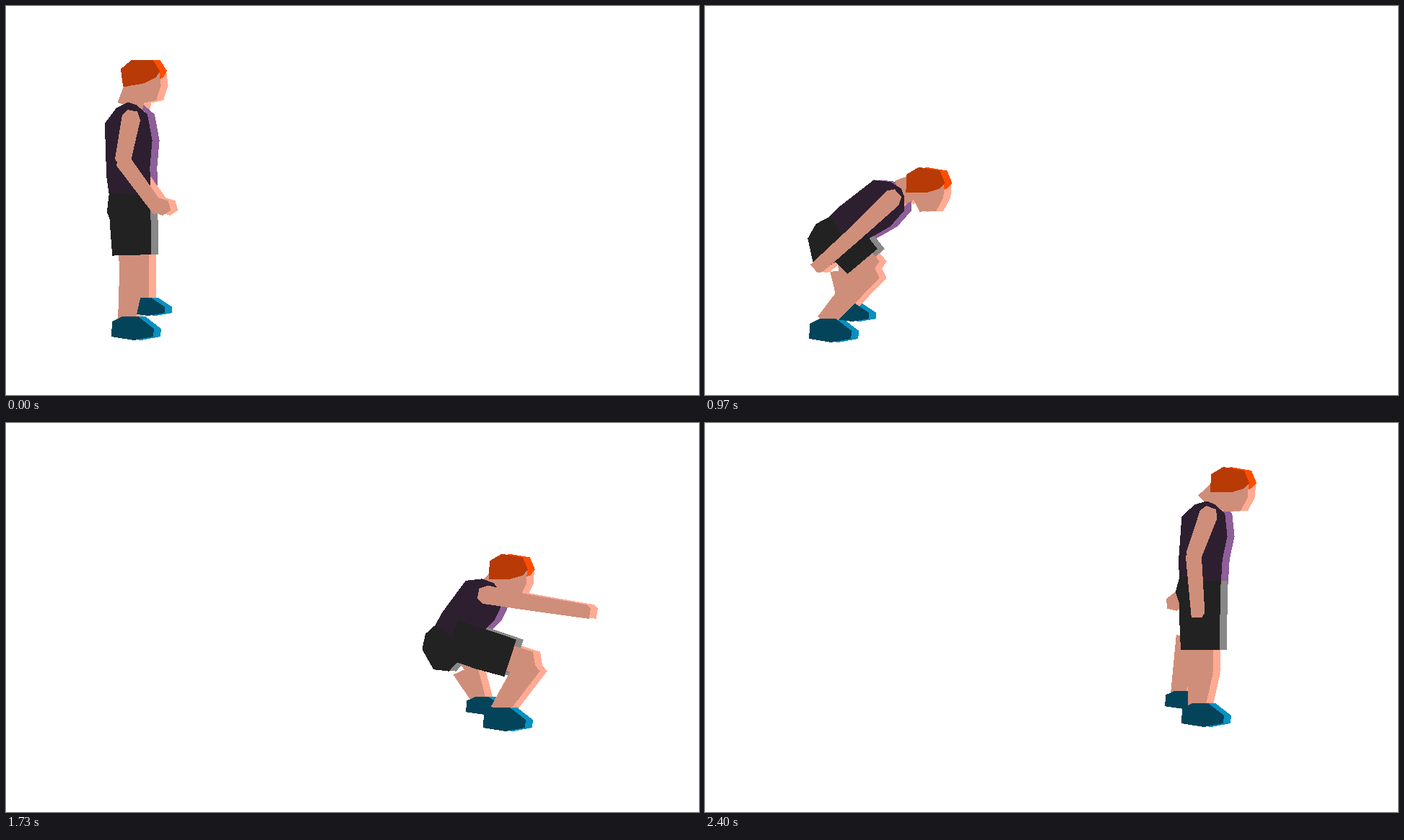
Animation, 960 px wide and 540 px high, one loop 2430 ms. Source, as an HTML page without scripts:

```html
<!DOCTYPE html>
<html lang="en">
<head>
<meta charset="utf-8">
<title>Standing long jump</title>
<style>
/* Joint positions in px; arm angles in degrees, 0 hanging and positive forward */
@property --head-x { syntax: "<number>"; inherits: true; initial-value: 0; }
@property --head-y { syntax: "<number>"; inherits: true; initial-value: 0; }
@property --neck-x { syntax: "<number>"; inherits: true; initial-value: 0; }
@property --neck-y { syntax: "<number>"; inherits: true; initial-value: 0; }
@property --waist-x { syntax: "<number>"; inherits: true; initial-value: 0; }
@property --waist-y { syntax: "<number>"; inherits: true; initial-value: 0; }
@property --knee-x { syntax: "<number>"; inherits: true; initial-value: 0; }
@property --knee-y { syntax: "<number>"; inherits: true; initial-value: 0; }
@property --ankle-x { syntax: "<number>"; inherits: true; initial-value: 0; }
@property --ankle-y { syntax: "<number>"; inherits: true; initial-value: 0; }
@property --far-x { syntax: "<number>"; inherits: true; initial-value: 0; }
@property --far-y { syntax: "<number>"; inherits: true; initial-value: 0; }
@property --upper { syntax: "<number>"; inherits: true; initial-value: 0; }
@property --fore { syntax: "<number>"; inherits: true; initial-value: 0; }
@property --far-hand { syntax: "<number>"; inherits: true; initial-value: 0; }
@property --foot { syntax: "<number>"; inherits: true; initial-value: 0; }
@property --tilt { syntax: "<number>"; inherits: true; initial-value: 0; }

html, body { margin: 0; width: 100%; height: 100%; overflow: hidden; background: #fff; }
svg { display: block; width: 100%; height: 100%; animation: jump 2430ms linear infinite; }
path { shape-rendering: crispEdges; }
.leap { animation: leap 2430ms infinite; }
.front { --skin: #cf8e7a; --hair: #b83a06; --shirt: #2e1f30; --shorts: #222; --shoe: #04445a; }
.side { --skin: #ffab94; --hair: #ff4d00; --shirt: #8e5f99; --shorts: #888; --shoe: #0890c0; }
.skin { fill: var(--skin); }
.hair { fill: var(--hair); }
.shirt { fill: var(--shirt); }
.shorts { fill: var(--shorts); }
.shoe { fill: var(--shoe); d: path("M-20 2 -6 -5 16 -5 38 12 37 23 10 28 -21 23Z"); }

/* A bone maps 0..100 along x onto the line between two joints */
.bone {
  --dx: calc(var(--x2) - var(--x1));
  --dy: calc(var(--y2) - var(--y1));
  transform: translate(calc(var(--x1) * 1px), calc(var(--y1) * 1px))
    rotate(atan2(var(--dy), var(--dx)))
    scaleX(calc(hypot(var(--dx), var(--dy)) / 100));
}
.neck { --x1: var(--neck-x); --y1: var(--neck-y); --x2: var(--head-x); --y2: var(--head-y); }
.spine { --x1: var(--waist-x); --y1: var(--waist-y); --x2: var(--neck-x); --y2: var(--neck-y); }
.thigh { --x1: var(--waist-x); --y1: var(--waist-y); --x2: var(--knee-x); --y2: var(--knee-y); }
.shin { --x1: var(--knee-x); --y1: var(--knee-y); --x2: var(--ankle-x); --y2: var(--ankle-y); }
.far-leg { --x1: var(--waist-x); --y1: var(--waist-y); --x2: var(--far-x); --y2: var(--far-y); }

.head { transform: translate(calc(var(--head-x) * 1px), calc(var(--head-y) * 1px)) rotate(calc(var(--tilt) * 1deg)); }
.foot { transform: translate(calc(var(--ankle-x) * 1px), calc(var(--ankle-y) * 1px)) rotate(calc(var(--foot) * 1deg)); }
.far-foot { transform: translate(calc(var(--far-x) * 1px), calc(var(--far-y) * 1px)) rotate(calc(var(--foot) * 1deg)) scale(.85, .75); }
.far-hand { transform: translate(calc(var(--waist-x) * 1px), calc(var(--waist-y) * 1px)) rotate(calc(var(--far-hand) * 1deg)); }
.arm {
  transform: translate(
      calc((.18 * var(--waist-x) + .82 * var(--neck-x)) * 1px),
      calc((.18 * var(--waist-y) + .82 * var(--neck-y)) * 1px))
    rotate(calc(var(--upper) * -1deg));
}
.forearm { transform: translateY(58px) rotate(calc((var(--upper) - var(--fore)) * 1deg)); }

@keyframes jump {
  /* stand */
  0% {
    --head-x: 186; --head-y: 92; --neck-x: 173; --neck-y: 135; --waist-x: 172; --waist-y: 263;
    --knee-x: 175; --knee-y: 372; --ankle-x: 167; --ankle-y: 436; --far-x: 188; --far-y: 409;
    --upper: -11; --fore: 36; --far-hand: 20; --foot: 0; --tilt: -10;
  }
  /* lean */
  25.93% {
    --head-x: 234; --head-y: 118; --neck-x: 203; --neck-y: 145; --waist-x: 160; --waist-y: 258;
    --knee-x: 173; --knee-y: 372; --ankle-x: 165; --ankle-y: 439; --far-x: 185; --far-y: 411;
    --upper: -35; --fore: -2; --far-hand: 32; --tilt: 0;
  }
  /* arms back */
  32.5% { --upper: -125; --fore: -135; }
  /* crouch */
  39.92% {
    --head-x: 305; --head-y: 243; --neck-x: 273; --neck-y: 258; --waist-x: 187; --waist-y: 318;
    --knee-x: 228; --knee-y: 366; --ankle-x: 165; --ankle-y: 439; --far-x: 195; --far-y: 417;
    --upper: -47; --fore: -49; --far-hand: 80;
  }
  45% { --foot: 0; }
  /* take off */
  50.62% {
    --head-x: 398; --head-y: 142; --neck-x: 390; --neck-y: 166; --waist-x: 340; --waist-y: 277;
    --knee-x: 238; --knee-y: 384; --ankle-x: 197; --ankle-y: 424; --far-x: 197; --far-y: 424;
    --upper: 133; --fore: 162; --far-hand: 130; --foot: 82;
  }
  /* arms up */
  53.1% { --upper: 150; --fore: 165; }
  /* heels forward */
  62.96% {
    --head-x: 622; --head-y: 184; --neck-x: 600; --neck-y: 206; --waist-x: 537; --waist-y: 275;
    --knee-x: 610; --knee-y: 333; --ankle-x: 652; --ankle-y: 399; --far-x: 632; --far-y: 386;
    --upper: 30; --fore: 22; --far-hand: 100; --foot: -50;
  }
  65.84% { --ankle-x: 682; --ankle-y: 400; --far-x: 655; --far-y: 384; --foot: 0; }
  /* land */
  69.96% {
    --head-x: 693; --head-y: 204; --neck-x: 675; --neck-y: 229; --waist-x: 612; --waist-y: 302;
    --knee-x: 725; --knee-y: 335; --upper: 85; --fore: 85; --far-hand: 60;
  }
  /* rise */
  81.07% {
    --head-x: 718; --head-y: 174; --neck-x: 702; --neck-y: 197; --waist-x: 653; --waist-y: 283;
    --knee-x: 721; --knee-y: 333; --ankle-x: 682; --ankle-y: 400; --far-x: 655; --far-y: 384;
    --upper: 38; --fore: 48; --far-hand: 5;
    animation-timing-function: cubic-bezier(.1, .6, .5, 1);
  }
  89.3% { --upper: -45; --fore: -35; }
  /* stand again */
  98.77%, 100% {
    --head-x: 727; --head-y: 80; --neck-x: 699; --neck-y: 110; --waist-x: 686; --waist-y: 219;
    --knee-x: 686; --knee-y: 345; --ankle-x: 681; --ankle-y: 394; --far-x: 655; --far-y: 376;
    --upper: -20; --fore: 4; --far-hand: 140; --foot: 0; --tilt: 0;
  }
}
/* Extra height while airborne */
@keyframes leap {
  0%, 50.62% { transform: none; animation-timing-function: ease-out; }
  54.32% { transform: translateY(-30px); animation-timing-function: ease-in; }
  62.96%, 100% { transform: none; }
}
</style>
</head>
<body>
<svg viewBox="0 0 960 540">
  <defs>
    <g id="jumper">
      <path class="far-hand skin" d="M0 -9 52 -11 60 0 52 11 0 9Z"/>
      <path class="far-leg bone skin" d="M50 -18 100 -10 100 10 50 18Z"/>
      <path class="far-foot shoe"/>
      <path class="thigh bone skin" d="M60 -18 100 -18 108 0 100 18 60 18Z"/>
      <path class="shin bone skin" d="M-8 0 0 -18 100 -12 100 12 0 18Z"/>
      <path class="foot shoe"/>
      <path class="neck bone skin" d="M-10 -18 100 -15 100 15 -10 18Z"/>
      <path class="spine bone shirt" d="M0 -29 20 -33 78 -36 95 -20 101 -4 98 8 88 23 60 30 30 27 0 29Z"/>
      <path class="spine bone shorts" d="M3 -29 -18 -32 -38 -22 -50 8 -38 26 0 29Z"/>
      <path class="thigh bone shorts" d="M0 -28 76 -27 76 27 40 29 0 28Z"/>
      <g class="head">
        <path class="skin" d="M-25 10 20 0 26 4 25 23 15 42 -8 43Z"/>
        <path class="hair" d="M-27 16 -26 -9 -9 -19 20 -14 27 3 20 11 3 16Z"/>
      </g>
      <g class="arm skin">
        <path d="M-13 -4 -7 -13 7 -13 13 -2 11 58 0 66 -11 58Z"/>
        <path class="forearm" d="M-11 0 0 -8 11 0 10 80 6 86 -9 86Z"/>
      </g>
    </g>
  </defs>
  <g class="leap">
    <use class="side" href="#jumper" x="10"/>
    <use class="front" href="#jumper"/>
  </g>
</svg>
</body>
</html>
```
